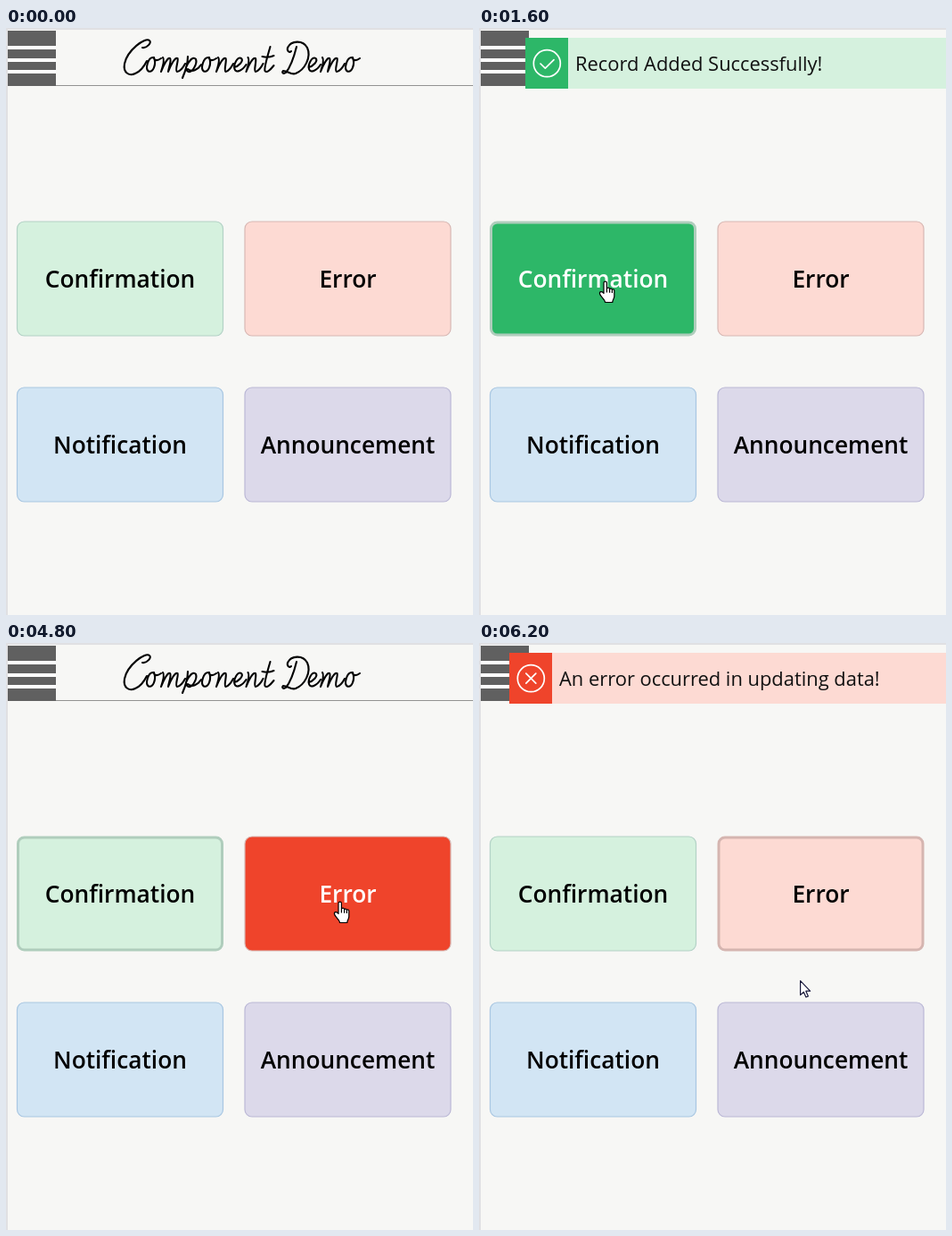
An HTML page for the animation above (8 s loop, 524 px wide and 658 px high).

```html
<!DOCTYPE html>
<html lang="en">
<head>
<meta charset="utf-8">
<title>Component Demo</title>
<style>
  html, body { margin: 0; width: 100%; height: 100%; overflow: hidden; background: #f7f7f5; }
  svg { display: block; font-family: "Open Sans", "Noto Sans", sans-serif; }
  .button text { font-size: 26.3px; font-weight: 600; text-anchor: middle; }
  .toast text { font-size: 21.9px; fill: #111; }
  .title, .icon { fill: none; stroke-linecap: round; stroke-linejoin: round; }
  .title { stroke: #000; stroke-width: 2.1; }
  .icon { stroke: #fff; stroke-width: 1.7; }
  .cursor { fill: #fff; stroke-linejoin: round; }
</style>
</head>
<body>
<svg id="stage" width="524" height="658" viewBox="0 0 524 658"></svg>
<script>
const LOOP = 8000;
const stage = document.getElementById("stage");

function add(parent, tag, attrs = {}, text) {
  const node = document.createElementNS("http://www.w3.org/2000/svg", tag);
  for (const key in attrs) node.setAttribute(key, attrs[key]);
  if (text) node.textContent = text;
  parent.append(node);
  return node;
}

function box(parent, x, y, width, height, fill) {
  return add(parent, "rect", { x, y, width, height, fill });
}

// Pen strokes of the script lettering: advance width, path from the baseline
const GLYPHS = {
  C: [25, "M21-27C26-26 32-33 29-35C24-39 4-24 1-9C-1 2 7 5 13 2C18 0 23-6 26-12"],
  D: [28.5, "M16-28C13-16 9-5 4 1C1 3-1 1 1-1C6-1 10 4 15 2C25-2 33-16 28-27C23-36 10-35 6-27C5-23 8-21 10-23"],
  o: [17, "M9-16C2-17-1-3 3-.5C8 1 12-8 9-16C9-12 13-12 17-15"],
  m: [27, "M2-16C4-14 2-6 0 0C3-8 8-17 10-15C12-13 9-6 8 0C11-8 16-17 18.5-15C20-13 15-1 18 0C21 0 25-5 27-9"],
  n: [19, "M2-16C4-14 2-6 0 0C3-8 8-17 10.5-15C12-12 8-1 10.5 0C13 0 17-5 19-9"],
  p: [18, "M3-17C3-10 0 0-3 7M1-5C4-12 9-18 12-14C14-9 8 1 4 0C1-1 2-3 3-3C8 1 14-2 18-8"],
  e: [14.5, "M1-5C6-6 12-12 9-15C5-18 0-8 1.5-3C3 2 10-1 14.5-8"],
  t: [12, "M8-28C5-18 1-4 2-1C4 2 8-2 12-7M-1-17C3-16 8-16 12-18"]
};

function drawTitle(text, x, y) {
  const group = add(stage, "g", { class: "title", role: "img", "aria-label": text });
  for (const char of text) {
    if (char === " ") { x += 9.5; continue; }
    const [advance, d] = GLYPHS[char];
    add(group, "path", { d, transform: `translate(${x} ${y})` });
    x += advance;
  }
}

function makeButton(label, x, y, fill, hover, border, focus) {
  const group = add(stage, "g", { class: "button" });
  const rect = box(group, 0, 0, 0, 0, fill);
  const text = add(group, "text", { x: x + 115.5, y: y + 74 }, label);
  return (hovered, focused) => {
    const inset = focused ? 1 : 0;
    const attrs = {
      x: x + inset, y: y + inset, width: 231 - 2 * inset, height: 128 - 2 * inset,
      rx: 8 - inset, fill: hovered ? hover : fill,
      stroke: focused ? focus : border, "stroke-width": focused ? 3 : 1.2
    };
    for (const key in attrs) rect.setAttribute(key, attrs[key]);
    text.setAttribute("fill", hovered ? "#fff" : "#000");
  };
}

function makeToast(message, dark, light, mark) {
  const group = add(stage, "g", { class: "toast" });
  box(group, 0, 11, 490, 57, light);
  box(group, 0, 11, 48, 57, dark);
  add(group, "circle", { class: "icon", cx: 24.3, cy: 39.7, r: 15 });
  add(group, "path", { class: "icon", d: mark });
  add(group, "text", { x: 56, y: 48 }, message);
  return group;
}

function makeCursor(d, stroke) {
  return add(stage, "path", { class: "cursor", d, stroke, "stroke-width": 1.2 });
}

function place(node, shown, x, y) {
  node.setAttribute("visibility", shown ? "visible" : "hidden");
  node.setAttribute("transform", `translate(${x} ${y})`);
}

box(stage, 0, 0, 524, 658, "#f7f7f5");
box(stage, 0, 0, 2, 658, "#e0e0e3");
box(stage, 0, 0, 524, 2, "#e0e0e3");
box(stage, 56, 64, 468, 1, "#929292");
box(stage, 2, 3, 54, 62, "#fff");
for (const [y, h] of [[3, 17], [24, 10], [38, 9], [51, 14]]) box(stage, 2, y, 54, h, "#606060");
drawTitle("Component Demo", 132, 49);

const buttons = {
  ok: makeButton("Confirmation", 12.5, 217, "#d5f1de", "#2db768", "#b3d2c6", "#afcdbc"),
  error: makeButton("Error", 268, 217, "#fddad3", "#ef442b", "#d8b8b4", "#d5b5b0"),
  note: makeButton("Notification", 12.5, 403, "#d2e5f4", "#2f7fc4", "#a9c7e2", "#a9c7e2"),
  news: makeButton("Announcement", 268, 403, "#dcd9ea", "#6a5ca8", "#bbb8d6", "#bbb8d6")
};
const toasts = {
  ok: makeToast("Record Added Successfully!", "#2db768", "#d5f1de", "M17 40l5.3 5.2 9.7-9.6"),
  error: makeToast("An error occurred in updating data!", "#ef442b", "#fddad3",
    "M18.8 34.2l11 11m0-11l-11 11")
};
const cursors = {
  arrow: makeCursor("M.6.6V16.6L4.3 13.2 6.9 19 9.4 17.9 6.8 12.2H11.6Z", "#17173a"),
  hand: makeCursor("M5 13V2.3a1.7 1.7 0 0 1 3.4 0V9a1.6 1.6 0 0 1 3.2.3a1.5 1.5 0 0 1 2.8.6" +
    "a1.4 1.4 0 0 1 2.4.8V17c0 3-2 4-2 7H6.5c0-3-5-6-6-9.5C0 12 3 11 5 14Z" +
    "M8.4 9v4M11.6 9.3v4M14.4 9.9v3.5", "#000")
};

// start time, cursor, x, y, hovered button, focused button
const POINTER = [
  [0, "", 0, 0, "", ""],
  [200, "hand", 135, 283.5, "ok", ""],
  [1000, "hand", 135, 283.5, "ok", "ok"],
  [2000, "arrow", 143, 367, "", "ok"],
  [4200, "arrow", 202, 367, "", "ok"],
  [4400, "arrow", 336, 367, "", "ok"],
  [4600, "hand", 374, 300, "error", "ok"],
  [4800, "hand", 368, 289.5, "error", "ok"],
  [5200, "hand", 361.5, 333.5, "error", "ok"],
  [5400, "hand", 361.5, 333.5, "error", "error"],
  [6200, "arrow", 360, 378, "", "error"]
];

// toast, slide start, hide time
const SLIDES = [["ok", 1118, 3800], ["error", 5435, LOOP]];

function render(time) {
  const now = Math.floor(time / 200) * 200;
  const [, kind, x, y, hover, focus] = POINTER.filter(step => step[0] <= now).pop();
  for (const name in buttons) buttons[name](name === hover, name === focus);
  for (const name in cursors) place(cursors[name], name === kind, x, y);
  for (const [name, start, end] of SLIDES) {
    const left = Math.max(34, 524 - (now - start) * 0.98);
    place(toasts[name], now >= start && now < end, Math.round(left), 0);
  }
}

const begin = performance.now();
function tick() {
  render((performance.now() - begin) % LOOP);
  requestAnimationFrame(tick);
}
tick();
</script>
</body>
</html>
```
